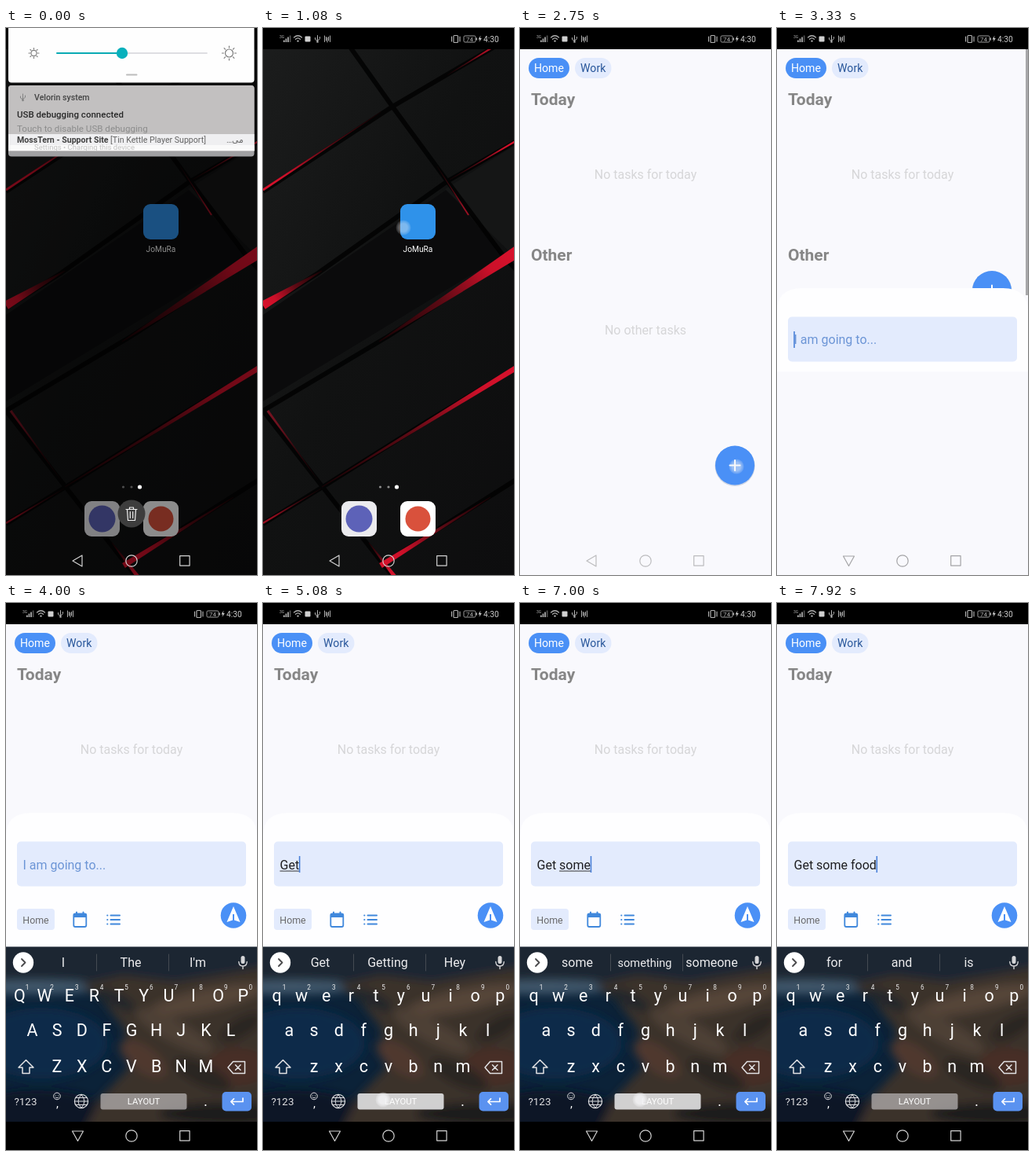
An HTML page for the animation above (8000 ms loop, 320 by 696 pixels).

```html
<!DOCTYPE html>
<html lang="en">
<head>
<meta charset="utf-8">
<title>Adding a task</title>
<style>
  html, body { margin: 0; width: 100%; height: 100%; overflow: hidden; background: #000; }
  svg { display: block; width: 320px; height: 696px; }
  text { font-family: Roboto, "Noto Sans", "DejaVu Sans", sans-serif; white-space: pre; }
  .mid { text-anchor: middle; }
  .line { fill: none; stroke-linecap: round; stroke-linejoin: round; }
</style>
</head>
<body>
<svg id="stage" viewBox="0 0 320 696" xmlns="http://www.w3.org/2000/svg"></svg>
<script>
const LOOP = 8000, STEP = 1000 / 12, HOLD = 160;
const stage = document.getElementById('stage');
const pen = document.createElement('canvas').getContext('2d');

const clamp = v => Math.max(0, Math.min(1, v));
const ramp = (t, a, b) => clamp((t - a) / (b - a));
const ease = p => p * p * (3 - 2 * p);
const mix = (a, b, p) => a + (b - a) * p;
const wide = s => { pen.font = '16px Roboto, "Noto Sans", sans-serif'; return pen.measureText(s).width; };

// ---- drawing helpers ----
const text = (x, y, size, fill, s, more = '') =>
  `<text x="${x}" y="${y}" font-size="${size}" fill="${fill}" ${more}>${s}</text>`;
const mid = (x, y, size, fill, s, more = '') => text(x, y, size, fill, s, `class="mid" ${more}`);
const box = (x, y, w, h, r, fill, more = '') =>
  `<rect x="${x}" y="${y}" width="${w}" height="${h}" rx="${r}" fill="${fill}" ${more}/>`;
const dot = (x, y, r, fill, more = '') => `<circle cx="${x}" cy="${y}" r="${r}" fill="${fill}" ${more}/>`;
const line = (d, color, w = 1, more = '') =>
  `<path class="line" d="${d}" stroke="${color}" stroke-width="${w}" ${more}/>`;

function sun(x, y, r, color) {
  let d = '';
  for (let i = 0; i < 8; i++) {
    const a = i * Math.PI / 4, c = Math.cos(a), s = Math.sin(a);
    d += `M${x + c * r * 1.4} ${y + s * r * 1.4}L${x + c * r * 1.8} ${y + s * r * 1.8}`;
  }
  return dot(x, y, r, 'none', `stroke="${color}" stroke-width="1.2"`) + line(d, color, 1.2);
}

const trident = (x, y, c) =>
  line(`M${x} ${y + 4}V${y - 4}M${x - 3} ${y - 1}V${y + 1}L${x} ${y + 3}L${x + 3} ${y}V${y - 2}`, c) + dot(x, y + 4, 1.3, c);

// ---- wallpaper ----
let fades = 0;
function slit(x1, y1, x2, y2, w1, w2, glow = 1) {
  const id = 'red' + fades++, len = Math.hypot(x2 - x1, y2 - y1);
  const nx = -(y2 - y1) / len / 2, ny = (x2 - x1) / len / 2;
  const pts = [x1 + nx * w1, y1 + ny * w1, x2 + nx * w2, y2 + ny * w2,
               x2 - nx * w2, y2 - ny * w2, x1 - nx * w1, y1 - ny * w1];
  return `<linearGradient id="${id}" gradientUnits="userSpaceOnUse" x1="${x1}" y1="${y1}" x2="${x2}" y2="${y2}">
    <stop offset="0" stop-color="#150204"/><stop offset=".45" stop-color="#5c0a14"/><stop offset=".8" stop-color="#cc1029"/>
    <stop offset="1" stop-color="#d8122c"/></linearGradient><polygon points="${pts}" fill="url(#${id})" opacity="${glow}"/>`;
}

const seams = 'M108 20L165 100L235 195L308 292L330 315M0 208L165 100L295 24M0 356L70 312L235 195L330 140' +
  'M0 487L160 392L330 282M0 487L76 584L172 706M0 631L76 584L210 500L330 428M150 684L330 570';
const wallpaper = `
  <linearGradient id="panel" x1="0" y1="0" x2="1" y2="1">
    <stop offset="0" stop-color="#1c1d1d"/><stop offset=".45" stop-color="#111212"/><stop offset="1" stop-color="#0d0d0e"/>
  </linearGradient>
  ${box(0, 0, 320, 696, 0, 'url(#panel)')}
  <polygon points="0,365 235,205 305,290 0,475" fill="#0b0b0c"/>
  <polygon points="232,205 320,150 320,290" fill="#151616"/>
  <path d="${seams}" fill="none" stroke="#000" stroke-width="6" opacity=".8"/>
  ${slit(150, 107, 0, 206, .5, 3)}${slit(235, 60, 292, 25, .5, 2.5, .8)}${slit(238, 193, 322, 144, .5, 2.5)}
  ${slit(75, 309, 0, 353, 1, 11)}${slit(148, 399, 325, 284, 1, 15)}
  ${slit(75, 584, 325, 431, 1, 7)}${slit(222, 176, 262, 238, .5, 2, .7)}
  ${slit(70, 575, 6, 487, .5, 3, .5)}${slit(74, 586, 0, 630, .5, 2.5, .7)}
  ${slit(135, 655, 168, 698, 1, 5)}${slit(290, 597, 150, 684, 1, 7)}`;

const home = `<g id="home">${wallpaper}
  ${box(175, 224, 45, 45, 9, '#2f92ea')}
  ${mid(197.5, 285, 10.2, '#fff', 'JoMuRa')}
  ${dot(149.5, 584, 1.6, '#8c8c8c')}${dot(160, 584, 1.6, '#8c8c8c')}
  ${box(100, 602, 45, 45, 9, '#ebebee')}${dot(122.5, 624.5, 17, '#5d62b8')}
  ${box(175, 602, 45, 45, 9, '#fff')}${dot(197.5, 624.5, 16, '#d9513c')}
  <rect id="dim" width="320" height="696" fill="#000"/>
  ${dot(170.5, 584, 2.6, '#fff')}</g>`;

// ---- status and navigation bars ----
const pale = '#b0b0b0', bright = '#cfcfcf';
const status = `<g id="status">${box(0, 0, 320, 27, 0, '#000')}
  ${text(21, 13, 5, pale, '3G')}
  ${[0, 1, 2, 3].map(i => box(26 + i * 2.6, 15.5 - i * 2, 1.7, 2.5 + i * 2, 0, i < 3 ? pale : '#505050')).join('')}
  ${line('M39.5 12Q44.5 7.5 49.5 12M41.5 14.3Q44.5 11.5 47.5 14.3', pale, 1.2)}${dot(44.5, 16.6, 1.2, pale)}
  ${box(53.5, 10.5, 7, 7, 1, bright)}${trident(69.5, 13.5, pale)}
  ${line('M78.5 10V17.5M85.5 10V17.5M80.5 11.5V16M83.5 11.5V16M82 12.5V18', pale)}
  ${box(243, 9.5, 5.5, 9, 1, 'none', `stroke="${pale}" stroke-width="1.2"`)}${line('M240.5 11V17M251 11V17', pale, 1.2)}
  ${box(256, 10, 15, 8, 1.5, 'none', `stroke="${pale}" stroke-width=".9"`)}${box(271.5, 12.5, 1.5, 3, 0, pale)}
  ${mid(263.5, 17, 8, pale, '74')}
  <path d="M277.5 9.5L274.5 14.5H276.5L275.5 18L278.8 13H276.8Z" fill="${bright}"/>
  ${text(281, 17.5, 10.2, bright, '4:30')}</g>`;

const nav = `<rect id="navBg" y="660" width="320" height="36" fill="#000"/>
  <g id="nav" class="line" stroke-width="1.2">
  <path id="back"/><circle cx="160" cy="678" r="7.2"/><rect x="221.7" y="671.7" width="12.4" height="12.4"/></g>`;

// ---- notification shade ----
const shade = `<g id="trash">${dot(160, 618, 17.5, '#3d3d3d')}
    ${line('M153 612.5H167M157.5 612V610H162.5V612M154.5 613L155.5 626.5H164.5L165.5 613M158.3 615.5V623.5M161.7 615.5V623.5', '#f0f0f0', 1.2)}</g>
  <g id="shade">
  ${box(3, -20, 313.5, 89.5, 4, '#fefefe')}
  ${sun(35.5, 32, 3.6, '#7c7c7c')}${sun(284.5, 32, 5, '#7c7c7c')}
  ${line('M148 32H256', '#dedee2', 1.8)}${line('M65 32H148', '#0aaab4', 2)}${dot(148, 32, 7.2, '#08b0bc')}
  ${line('M154 59.5H166.5', '#bcbcbc', 2)}
  ${box(3, 73, 313.5, 90.5, 4, '#a0a0a2')}
  <path d="M3 157V77Q3 73 7 73H312.5Q316.5 73 316.5 77V157Z" fill="#c2c0c0"/>
  ${trident(21.5, 88, '#818181')}
  ${text(36, 91.7, 10.6, '#444', 'Velorin system', 'font-weight="500"')}
  ${text(14, 114, 11.5, '#292929', 'USB debugging connected', 'font-weight="500"')}
  ${text(14, 132, 11.6, '#8c8c8c', 'Touch to disable USB debugging')}
  ${box(3, 135, 313.5, 21, 0, '#efeff1')}${box(3, 149, 313.5, 7, 0, '#fafafa')}
  ${text(14, 146, 10.6, '#404040', 'MossTern - Support Site', 'font-weight="700"')}
  ${text(133, 146, 10.6, '#626262', '[Tin Kettle Player Support]')}
  ${text(281, 146, 10.6, '#626262', '…می')}
  ${text(36, 155, 9.5, '#c4c4c4', 'Settings • Charging this device')}</g>`;

// ---- task list and entry sheet ----
const blue = '#4a90f6', paper = '#f9f9fd', tint = '#e3ebfd', icon = '#4088dc';
const app = `<rect id="window" fill="${paper}"/>
  <g id="page">
    ${box(11, 38, 52, 26, 13, blue)}${mid(37, 56, 14.1, '#fff', 'Home')}
    ${box(70, 38, 46.5, 26, 13, tint)}${mid(93.2, 56, 14.1, '#28569a', 'Work')}
    ${text(14, 97.5, 21, '#868686', 'Today', 'font-weight="700"')}
    ${mid(160, 191.5, 16, '#d6d6d8', 'No tasks for today')}
    ${text(14, 295.5, 21, '#868686', 'Other', 'font-weight="700"')}
    ${mid(160, 389.5, 16, '#d6d6d8', 'No other tasks')}
    <g id="fab">${dot(0, .8, 25.6, '#cfd6e4')}${dot(0, 0, 25, blue)}${line('M-6.5 0H6.5M0 -6.5V6.5', '#fff', 2)}</g>
    <rect id="bar" x="317" y="27" width="3" height="313" fill="#a8a8aa"/>
  </g>
  <clipPath id="above"><rect id="cut" width="320" height="660"/></clipPath>
  <g clip-path="url(#above)"><g id="sheet">
    <path d="M0 400V30Q0 0 32 0H288Q320 0 320 30V400Z" fill="#fefeff"/>
    ${box(14, 36.5, 292, 57, 5, tint)}
    <text id="entry" x="21.5" y="71.5" font-size="16"></text>
    <rect id="under" y="73.5" height="1.1" fill="#444"/>
    <rect id="caret" y="55" width="1.6" height="21" fill="#4a80d8"/>
    ${box(14, 122, 48, 27, 4, tint)}${mid(38, 140.5, 12.4, '#6a6a6c', 'Home')}
    ${box(86.3, 128.5, 16, 16.5, 2, 'none', `stroke="${icon}" stroke-width="1.8"`)}${box(86, 128, 16.5, 5, 1, icon)}
    ${line('M90 126.5V129M98.5 126.5V129', icon, 2)}
    ${line('M133.5 130.5H145M133.5 136H145M133.5 141.5H145M129.2 130.5H129.4M129.2 136H129.4M129.2 141.5H129.4', icon, 2)}
    ${dot(290, 130.5, 16.3, blue)}<path d="M290 119L298.5 139L291 136.5V129H289V136.5L281.5 139Z" fill="#fff"/>
  </g></g>`;

// ---- keyboard ----
const rows = [['qwertyuiop', 17.5, 500], ['asdfghjkl', 33.4, 544.5], ['zxcvbnm', 65, 590]];
const keys = { ' ': [153, 632], food: [159, 458] };
let letters = '';
for (const [row, x0, y] of rows) {
  [...row].forEach((c, i) => {
    const x = x0 + i * 31.65;
    keys[c] = [x, y];
    letters += mid(x, y + 6.5, 21.5, '#fff', c, 'data-key="1"');
    if (y === 500) letters += mid(x + 9.5, 492, 8.2, '#ececec', (i + 1) % 10);
  });
}
const blob = (x, y, rx, ry, fill, tilt = 0) =>
  `<ellipse cx="${x}" cy="${y}" rx="${rx}" ry="${ry}" fill="${fill}" transform="rotate(${tilt} ${x} ${y})"/>`;
// a dark sea on the left, a brown cliff coast on the right
const coast = `${box(0, 437.5, 320, 222.5, 0, '#0b2238')}
  <g filter="url(#soft)">
    ${box(-20, 420, 360, 62, 0, '#1d2833')}
    ${blob(35, 489, 90, 9, '#40566a')}
    ${blob(45, 560, 85, 45, '#0a2c48')}${blob(40, 650, 90, 30, '#091826')}
    <polygon points="95,486 150,474 215,482 340,462 340,680 95,680 120,630 158,590 150,540 122,505" fill="#3b322c"/>
    ${blob(255, 505, 75, 14, '#544539', -12)}${blob(215, 545, 55, 14, '#4d3f35', 28)}
    ${blob(175, 580, 35, 16, '#50392f', 35)}${blob(295, 590, 40, 24, '#462f28')}
    ${blob(250, 600, 40, 14, '#2a2522', 25)}${blob(285, 650, 90, 14, '#1b1a1b')}
    ${blob(140, 505, 28, 9, '#22262a', 25)}${blob(300, 540, 30, 12, '#2b2723', -30)}
  </g>`;
const keyboard = `<filter id="soft" x="-20%" y="-20%" width="140%" height="140%"><feGaussianBlur stdDeviation="6"/></filter>
  <clipPath id="tray"><rect y="437.5" width="320" height="222.5"/></clipPath>
  <g clip-path="url(#tray)"><g id="keyboard">
    ${coast}
    ${dot(22, 457.5, 13.2, '#fff')}${line('M20 453L24.5 457.5L20 462', '#4a4a4c', 1.8)}
    ${line('M115.5 447V468M207.5 447V468', '#8c8c8c', .8, 'opacity=".45"')}
    ${[73, 159, 244.5].map(x => mid(x, 463, 16, '#ececee', '', 'data-hint="1"')).join('')}
    ${box(299.5, 449, 5, 10, 2.5, '#d6d6d8')}${line('M296.8 456.5Q297 462 302 462Q307 462 307.2 456.5M302 462V465.5', '#d6d6d8', 1.4)}
    ${letters}
    ${line('M25.5 581.5L35 591H30V598.5H21V591H16Z', '#e2e2e4', 1.5)}
    ${line('M289.5 583.5H304.5V598.5H289.5L283 591ZM292.5 587.8L299 594.3M299 587.8L292.5 594.3', '#e2e2e4', 1.5)}
    ${text(10.5, 639, 13.4, '#dedee0', '?123')}
    ${dot(65, 627.5, 4.3, 'none', 'stroke="#dedee0"')}${line('M63.3 626.5V626.6M66.7 626.5V626.6M63 629Q65 630.8 67 629', '#dedee0', .9)}
    ${mid(65.5, 642, 15, '#fff', ',')}
    ${dot(96, 634, 8.6, 'none', 'stroke="#dedee0" stroke-width="1.2"')}
    ${line('M87.5 634H104.5M89 629.5H103M89 638.5H103M96 625.5Q88 634 96 642.5Q104 634 96 625.5', '#dedee0')}
    <rect id="space" x="120.5" y="624" width="110" height="20.5" rx="3"/>
    ${mid(175.5, 638.2, 11.3, '#fff', 'LAYOUT')}
    ${mid(254.5, 640, 19, '#fff', '.')}
    ${box(275.5, 622, 37.5, 24.5, 5, '#5a92f0')}${line('M302 630V634.5H287M290.5 630.8L286.8 634.5L290.5 638.2', '#fff', 1.7)}
    <g id="popup">${box(-17.5, -81, 35, 99, 3, '#3b414b', 'opacity=".96"')}<text id="big" class="mid" y="-47.5" font-size="25" fill="#fff"></text></g>
  </g></g>`;

// the status bar lies over the app window but under the shade
const [backdrop, content] = app.split('<g id="page">');
stage.innerHTML = home + backdrop + status + shade + '<g id="page">' + content + keyboard + nav +
  `<radialGradient id="glow"><stop offset=".55" stop-color="#f2f2f4"/><stop offset="1" stop-color="#f2f2f4" stop-opacity=".25"/></radialGradient>
  <circle id="touch" r="9.5" fill="url(#glow)"/>`;
const el = id => document.getElementById(id);
const caps = [...stage.querySelectorAll('[data-key]')];
const hints = [...stage.querySelectorAll('[data-hint]')];

const set = (id, attrs) => { for (const k in attrs) el(id).setAttribute(k, attrs[k]); };
const show = (id, o) => set(id, { opacity: o, visibility: o > 0 ? 'visible' : 'hidden' });
const move = (id, x, y) => set(id, { transform: `translate(${x} ${y})` });

// press time, key, text after release, suggestions after release
const presses = [
  [4170, 'g', 'G', 'Good Get Go'],
  [4420, 'e', 'Ge', 'Get Getting Hey'],
  [4670, 't', 'Get', 'Get Getting Hey'],
  [5000, ' ', 'Get ', 'the a some'],
  [5500, 's', 'Get s', 's so some'],
  [5830, 'o', 'Get so', 'so some something'],
  [6250, 'm', 'Get som', 'some something someone'],
  [6580, 'e', 'Get some', 'some something someone'],
  [6920, ' ', 'Get some ', 'of more food'],
  [7080, 'f', 'Get some f', 'for food from'],
  [7330, 'o', 'Get some fo', 'for food follow'],
  [7670, 'food', 'Get some food', 'for and is']
];
const taps = [[1000, 179, 254, .4], [2670, 276, 558, .5]];
const isLetter = press => press && press[1].length === 1 && press[1] !== ' ';

function drawTyping(t) {
  const done = presses.filter(p => t >= p[0] + HOLD).pop();
  const down = presses.find(p => t >= p[0] && t < p[0] + HOLD);
  const typed = done ? done[2] : '';
  const from = wide(typed.slice(0, typed.lastIndexOf(' ') + 1)), to = wide(typed);

  el('entry').textContent = typed || 'I am going to...';
  set('entry', { fill: typed ? '#1e1e20' : '#6c95d6' });
  set('under', { x: 21.5 + from, width: done && done[1] !== 'food' ? to - from : 0 });
  set('caret', { x: 21.2 + to });
  show('caret', (t - (done ? done[0] + HOLD : 3300)) % 1000 < 500 ? 1 : 0);

  const upper = !done;
  caps.forEach(c => { c.textContent = upper ? c.textContent.toUpperCase() : c.textContent.toLowerCase(); });
  const words = (done ? done[3] : "I The I'm").split(' ');
  hints.forEach((h, i) => {
    h.textContent = words[i];
    h.setAttribute('font-size', Math.min(16, 16 * 69 / wide(words[i])));
  });

  set('space', down && down[1] === ' '
    ? { fill: '#dededf', 'fill-opacity': .92 } : { fill: '#b4b0b0', 'fill-opacity': .75 });
  show('popup', isLetter(down) ? 1 : 0);
  if (isLetter(down)) {
    move('popup', ...keys[down[1]]);
    el('big').textContent = upper ? down[1].toUpperCase() : down[1];
  }
  return down;
}

function draw(t) {
  // shade closes, launcher brightens
  const close = ramp(t, 80, 500);
  move('shade', 0, -175 * close * close);
  show('shade', close < 1 ? 1 : 0);
  show('trash', 1 - ramp(t, 80, 330));
  show('dim', .45 * (1 - ramp(t, 80, 660)));

  // app window grows out of its icon
  const open = ease(ramp(t, 1160, 1420));
  set('window', { x: mix(175, 0, open), y: mix(224, 0, open), width: mix(45, 320, open),
    height: mix(45, 696, open), rx: mix(9, 0, open) });
  show('window', ramp(t, 1160, 1250));
  show('page', ramp(t, 1980, 2330));

  // entry sheet, with the layout pushed up by the keyboard
  const bottom = t < 3250 ? 660 : 437.5;
  const rise = t < 3330 ? 106.5 * ramp(t, 2950, 3330) : mix(106.5, 170.5, ease(ramp(t, 3333, 3600)));
  move('sheet', 0, bottom - rise);
  set('cut', { height: bottom });
  move('fab', 274, bottom - 103.5);
  show('bar', t < 3250 ? 0 : 1 - ramp(t, 3500, 3800));

  const slide = ease(ramp(t, 3370, 3670));
  move('keyboard', 0, 223 * (1 - slide));
  show('keyboard', slide > 0 ? 1 : 0);
  show('navBg', slide > 0 ? 1 : 0);
  set('nav', { stroke: slide > 0 || t < 1250 ? '#d2d2d2' : t < 3250 ? '#bcbcbe' : '#a4a4a6' });
  set('back', { d: t < 3250 ? 'M97 671V685L85 678Z' : 'M84.5 672H98.5L91.5 684.5Z' });

  const down = drawTyping(t);
  const tap = taps.find(p => t >= p[0] && t < p[0] + HOLD);
  show('touch', down ? .85 : tap ? tap[3] : 0);
  if (down) {
    const [x, y] = keys[down[1]];
    move('touch', x + (isLetter(down) ? 3 : 0), y - (isLetter(down) ? 8 : 0));
  } else if (tap) move('touch', tap[1], tap[2]);
}

function frame(now) {
  const step = Math.floor((now % LOOP + 4) / STEP) % 96;
  draw(step * STEP);
  requestAnimationFrame(frame);
}
draw(0);
requestAnimationFrame(frame);
</script>
</body>
</html>
```
